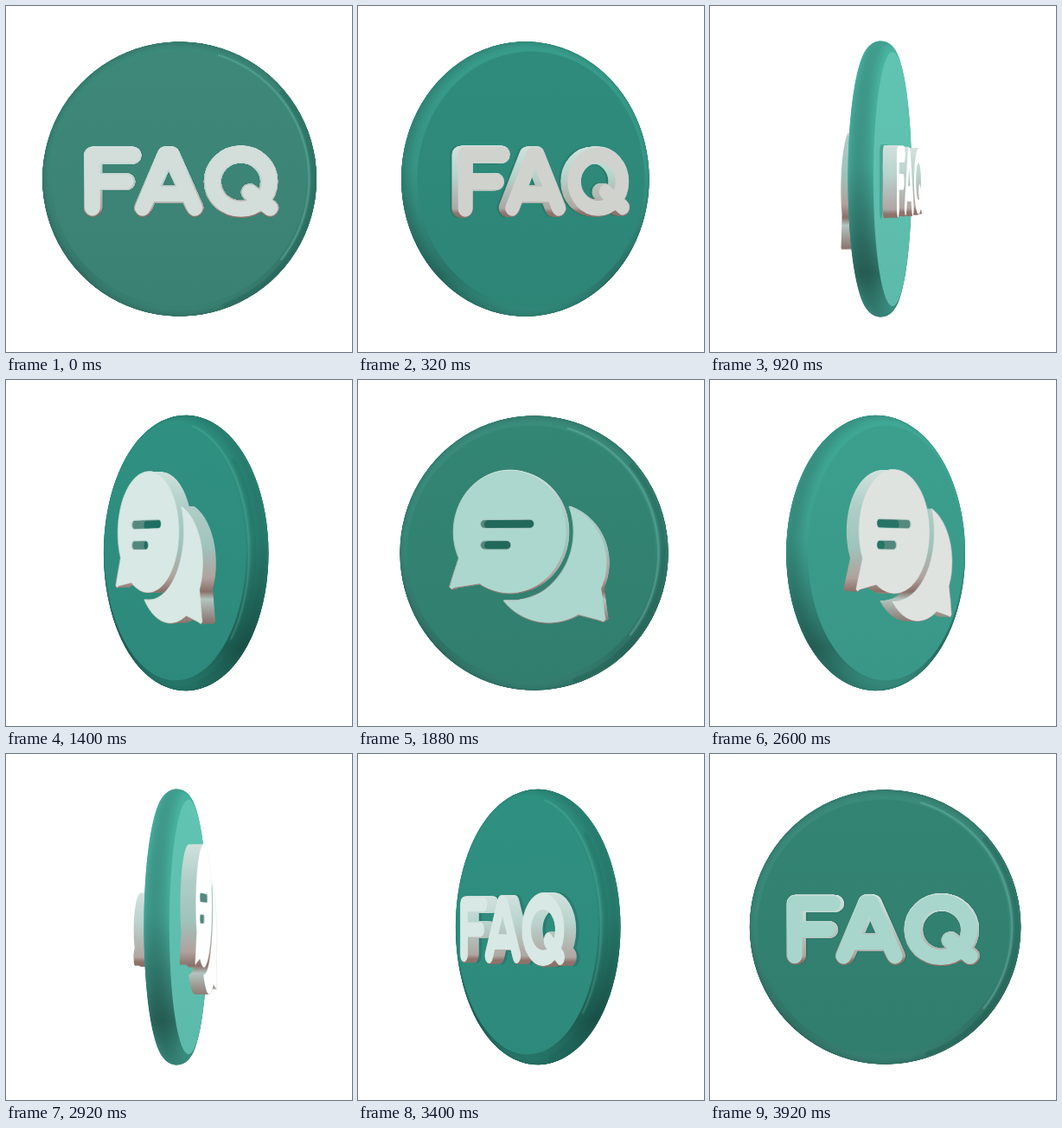
An HTML page with a canvas for the animation above (3960 ms loop, 400 by 400 pixels).

```html
<!DOCTYPE html>
<html lang="en">
<head>
<meta charset="utf-8">
<title>FAQ</title>
<style>
html, body { margin: 0; width: 100%; height: 100%; overflow: hidden; background: #fff; }
canvas { display: block; width: 400px; height: 400px; }
</style>
</head>
<body>
<canvas id="stage" width="400" height="400" role="img" aria-label="FAQ">FAQ</canvas>
<script>
const ctx = document.getElementById('stage').getContext('2d');
const LOOP = 3960, STEP = 40, DEG = Math.PI / 180;
const CAMERA = 1400, RADIUS = 158.5, HALF = 13.5;
const clamp = v => Math.max(0, Math.min(1, v));

// Colour ramps keyed by the angle of the visible side: [angle, r, g, b]
const FACE = [[-90, 66, 165, 148], [-56, 46, 140, 125], [-9, 50, 128, 112], [-2, 60, 132, 117],
  [27, 46, 136, 120], [60, 62, 160, 143], [82, 96, 192, 175]];
const RIM = [[-90, 56, 156, 140], [-56, 42, 132, 117], [-2, 57, 130, 115], [27, 52, 144, 128], [82, 66, 162, 146]];
const RELIEF = [[-90, 232, 246, 243], [-56, 216, 232, 228], [-9, 168, 214, 204], [-2, 211, 221, 218],
  [27, 208, 210, 206], [60, 228, 232, 230], [82, 255, 255, 255]];

function ramp(stops, at) {
  let i = 1;
  while (i < stops.length - 1 && at > stops[i][0]) i++;
  const a = stops[i - 1], b = stops[i], k = clamp((at - a[0]) / (b[0] - a[0]));
  return [1, 2, 3].map(n => a[n] + (b[n] - a[n]) * k);
}
const tint = (c, k = 1) => `rgb(${c.map(v => Math.round(Math.min(255, v * k)))})`;

function vertical(top, bottom, stops) {
  const g = ctx.createLinearGradient(0, top, 0, bottom);
  for (const [at, color] of stops) g.addColorStop(at, color);
  return g;
}

let sin, cos;
function turn(degrees) {
  sin = Math.sin(degrees * DEG);
  cos = Math.cos(degrees * DEG);
}
function project(x, y, z) {
  const s = CAMERA / (CAMERA + x * sin - z * cos);
  return [(x * cos + z * sin) * s, y * s];
}
function trace(points, z, closed = true) {
  points.forEach(([x, y], i) => {
    const p = project(x, y, z);
    i ? ctx.lineTo(...p) : ctx.moveTo(...p);
  });
  if (closed) ctx.closePath();
}
// Draws layers from the farthest to the nearest.
function stack(from, to, layer) {
  for (let i = 0; i <= to - from; i++) layer(cos > 0 ? from + i : to - i);
}
function arc(cx, cy, rx, ry, from, to, n = 90) {
  return Array.from({ length: n + 1 }, (_, i) => {
    const a = (from + (to - from) * i / n) * DEG;
    return [cx + rx * Math.cos(a), cy + ry * Math.sin(a)];
  });
}
const inside = (cx, cy, rx, ry) => ([x, y]) => ((x - cx) / rx) ** 2 + ((y - cy) / ry) ** 2 < 1;

// Speech bubbles: a full one, and a crescent cut by a gap around the first
const big = [-18, -24, 66, 70], gap = [-18, -24, 74, 78], small = [27, 11, 67, 68];
const bigShape = [...arc(...big, 155, 482), [-82, 40], [-86, 42], [-89, 39], [-87, 33]];
const outer = arc(...small, -142, 218, 240).filter(p => !inside(...gap)(p));
const inner = arc(...gap, -142, 218, 240).filter(inside(...small)).reverse();
const split = a => outer.findIndex(([x, y]) => Math.atan2((y - 11) / 68, (x - 27) / 67) >= a * DEG);
const smallShape = [...outer.slice(0, split(25)), [92, 68], [93, 74], [90, 77], [84, 75],
  ...outer.slice(split(58)), ...inner];
const bar = (left, right, y, r = 5) => [
  ...arc(right - r, y, r, r, -90, 90, 8), ...arc(left + r, y, r, r, 90, 270, 8)];
const bars = [bar(-52, 11, -33), bar(-52, -16, -9)];

function fillShapes(shapes, z, color) {
  ctx.beginPath();
  shapes.forEach(shape => trace(shape, z));
  ctx.fillStyle = color;
  ctx.fill('evenodd');
}

// Letters as round strokes: centre x and path
const letters = [
  [-77, new Path2D('M-97 33V-27H-52M-97 3H-59')],
  [-11, new Path2D('M-40 33L-14 -27H-8L19 33M-30 17H9')],
  [71, new Path2D('M103 3A32 31 0 1 1 39 3A32 31 0 1 1 103 3M81 15L104 33')]
];

function drawLetters(z, color, weight) {
  ctx.strokeStyle = color;
  ctx.lineWidth = weight;
  for (const [cx, path] of letters) {
    const s = CAMERA / (CAMERA + cx * sin - z * cos);
    const x = cx * cos + z * sin;
    const sx = s * cos - x * s * s * sin / CAMERA;
    ctx.save();
    ctx.transform(sx, 0, 0, s, x * s, 0);
    ctx.translate(-cx, 0);
    ctx.stroke(path);
    ctx.restore();
  }
}

function drawFaq(angle) {
  const side = vertical(-39, 44, [[0, '#d3e2de'], [0.4, '#b9d4cd'], [0.87, '#b0a6a2'], [0.93, '#8f746c'], [1, '#8b6f67']]);
  if (cos > 0) drawLetters(HALF, 'rgba(20,80,70,.25)', 21);
  stack(17, 31, z => drawLetters(z, side, 19.5));
  if (cos > 0) drawLetters(32, tint(ramp(RELIEF, angle)), 17.5);
}

function drawBubbles(angle) {
  const shapes = [bigShape, ...bars, smallShape];
  const side = vertical(-96, 82, [[0, '#cfe2dd'], [0.25, '#aecdc6'], [0.5, '#9fc3bb'],
    [0.7, '#b0a29d'], [0.79, '#8a7069'], [0.84, '#b3c4bf'], [1, '#88706a']]);
  stack(15, 31, z => fillShapes(shapes, z, side));
  if (cos < 0) return;
  fillShapes(bars, 31, 'rgba(20,84,74,.55)');
  fillShapes(shapes, 32, tint(ramp(RELIEF, angle)));
  ctx.globalAlpha = cos;
  ctx.strokeStyle = side;
  ctx.lineWidth = 1;
  ctx.stroke();
  ctx.globalAlpha = 1;
}

function drawDisc(angle) {
  const rim = ramp(RIM, angle), depth = 0.1 + 0.28 * Math.abs(sin);
  stack(-HALF, HALF, z => {
    const r = RADIUS - HALF + Math.sqrt(HALF * HALF - z * z);
    const k = 0.9 + 0.16 * (z / HALF) ** 2;
    ctx.beginPath();
    trace(arc(0, 0, r, r, 0, 360), z);
    ctx.fillStyle = vertical(-160, 160, [[0, tint(rim, k * (1 + depth * 0.2))], [0.45, tint(rim, k)],
      [0.84, tint(rim, k * (1 - depth))], [1, tint(rim, k * (1 - depth * 0.3))]]);
    ctx.fill();
  });
  const face = ramp(FACE, angle);
  ctx.beginPath();
  trace(arc(0, 0, 146, 146, 0, 360), HALF);
  ctx.fillStyle = vertical(-146, 146, [[0, tint(face, 1.03)], [1, tint(face, 0.98)]]);
  ctx.fill();

  // Light catching the right-hand bevel
  const glow = clamp(1 - (angle + 5) / 25) * cos;
  const edge = (r, z, from, to, color, width) => {
    ctx.beginPath();
    trace(arc(0, 0, r, r, from, to), z, false);
    ctx.strokeStyle = color;
    ctx.lineWidth = width;
    ctx.stroke();
  };
  edge(154, 9, -40, 70, `rgba(24,88,76,${0.3 * glow})`, 5);
  edge(149, 12, -72, 38, `rgba(112,186,170,${0.4 * glow})`, 2.5);
}

function draw(time) {
  const turned = time * 0.09 - 2;
  const angle = (turned + 90 + 360) % 180 - 90;
  const faqInFront = Math.floor((turned + 450) / 180) % 2 === 0;
  const [front, back] = faqInFront ? [drawFaq, drawBubbles] : [drawBubbles, drawFaq];
  ctx.setTransform(1, 0, 0, 1, 0, 0);
  ctx.fillStyle = '#fff';
  ctx.fillRect(0, 0, 400, 400);
  ctx.translate(200, 200);
  ctx.lineCap = ctx.lineJoin = 'round';
  turn(angle + 180);
  back(angle);
  turn(angle);
  drawDisc(angle);
  front(angle);
}

function tick() {
  draw(Math.floor(performance.now() % LOOP / STEP) * STEP);
  requestAnimationFrame(tick);
}
tick();
</script>
</body>
</html>
```
